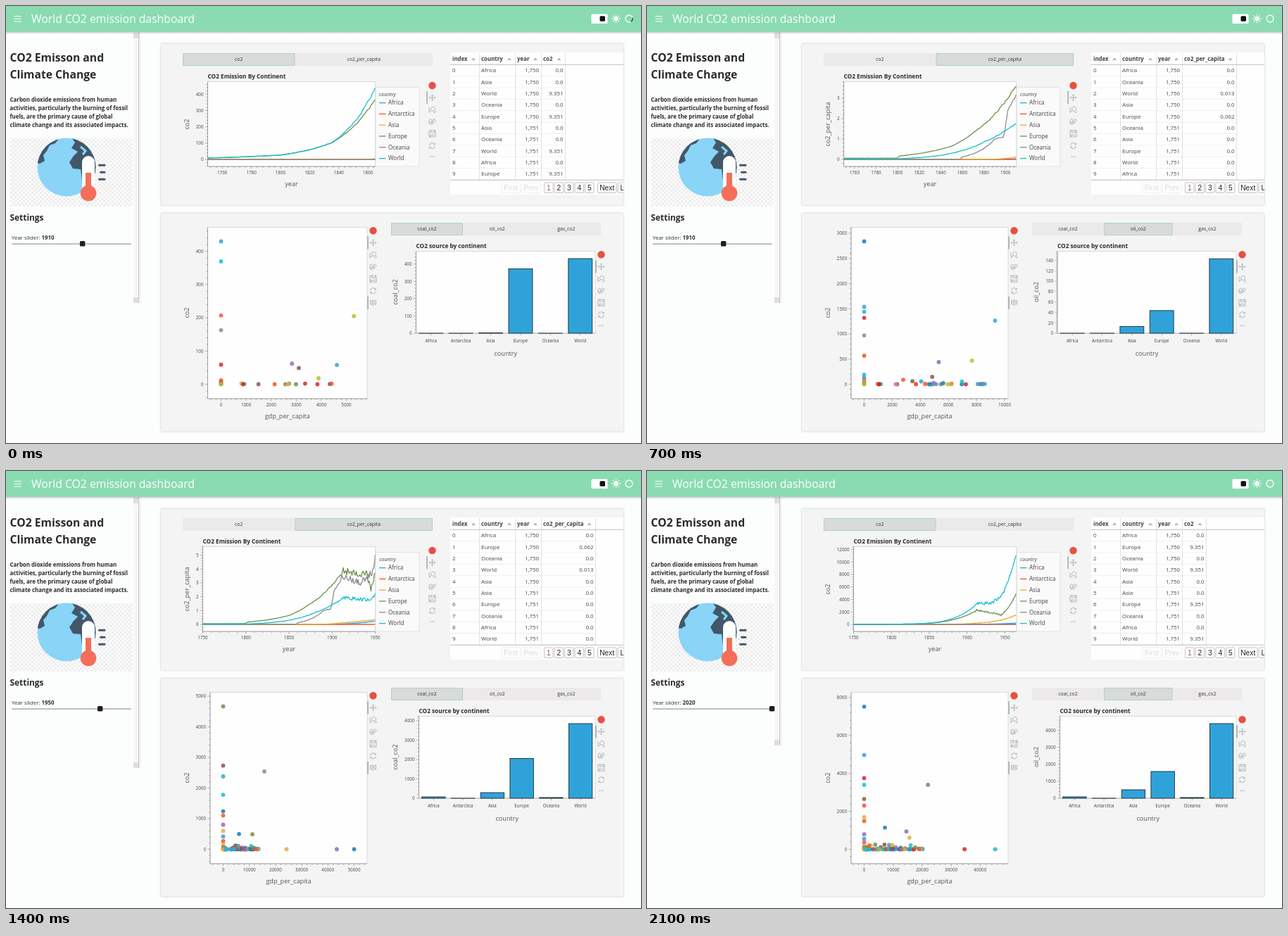
Recreate the animation shown at these times as an HTML page. Size 902 by 621 pixels, loop 2.8 s.

```html
<!DOCTYPE html>
<html lang="en">
<head>
<meta charset="utf-8">
<title>Emission dashboard</title>
<style>
html, body { margin: 0; width: 100%; height: 100%; overflow: hidden; background: #fcfefd; }
svg { display: block; width: 902px; height: 621px; font-family: "Open Sans", sans-serif; }
.card { fill: #f4f4f4; filter: drop-shadow(0 0.5px 1px #0004); }
.btn { font-family: "Liberation Sans", Arial, sans-serif; }
</style>
</head>
<body>
<svg id="stage" viewBox="0 0 902 621" xmlns="http://www.w3.org/2000/svg"></svg>
<script>
const STEP = 700;
const PLACES = ['Africa', 'Antarctica', 'Asia', 'Europe', 'Oceania', 'World'];
const INK = ['#30a2da', '#fc4f30', '#e5ae38', '#6d904f', '#8b8b8b', '#17becf'];
const DOTS = [...INK, '#9467bd', '#d62728', '#1f77b4', '#e377c2', '#bcbd22', '#8c564b'];
const MID = 'text-anchor="middle"', END = 'text-anchor="end"';

const text = (x, y, s, size, attr = '', fill = '#444') =>
  `<text x="${x}" y="${y}" font-size="${size}" fill="${fill}" ${attr}>${s}</text>`;
const bold = (x, y, s, size, fill = '#2b2b2b') => text(x, y, s, size, 'font-weight="700"', fill);
const rect = (x, y, w, h, fill, attr = '') =>
  `<rect x="${x}" y="${y}" width="${w}" height="${h}" fill="${fill}" ${attr}/>`;
const path = (d, stroke, w = 1, attr = '') =>
  `<path d="${d}" fill="none" stroke="${stroke}" stroke-width="${w}" ${attr}/>`;
const circle = (x, y, r, fill, attr = '') => `<circle cx="${x}" cy="${y}" r="${r}" fill="${fill}" ${attr}/>`;
const turned = (x, y, s) =>
  text(0, 0, s, 9.1, `${MID} transform="translate(${x} ${y}) rotate(-90)"`, '#555');

function random(seed) {
  return () => (seed = (seed * 16807) % 2147483647) / 2147483647;
}

// Linear scale: pixel of the base value, pixels per labelled step, size of the step.
function scale(zero, px, step, base = 0) {
  const at = v => zero + (v - base) * px / step;
  return { at, px, step, base };
}

function axis([l, t, r, b], { at, px, step, base }, vertical) {
  const lo = vertical ? t : l, hi = vertical ? b : r;
  let d = vertical ? `M${l} ${t}V${b}` : `M${l} ${b}H${r}`, out = '';
  for (let k = -10; k < 60; k++) {
    const v = base + step * k / 5, p = at(v), len = k % 5 ? 2 : 3.5;
    if (p < lo - 0.5 || p > hi + 0.5) continue;
    d += vertical ? `M${l} ${p}h${-len}` : `M${p} ${b}v${len}`;
    if (k % 5 === 0) out += vertical ? text(l - 6, p + 2.3, v, 6.3, END) : text(p, b + 11.3, v, 6.3, MID);
  }
  return path(d, '#777', 0.6) + out;
}

const frame = ([l, t, r, b]) => rect(l, t, r - l, b - t, '#fdfefd', 'stroke="#d4d4d4" stroke-width="0.8"');

function tabs(edges, names, on, y) {
  let out = rect(edges[0], y, edges[edges.length - 1] - edges[0], 18, '#ece9ea');
  out += rect(edges[on] + 0.5, y + 0.5, edges[on + 1] - edges[on] - 1, 17, '#d9dada', 'stroke="#9fd0bc" stroke-width="0.8"');
  names.forEach((s, i) => out += text((edges[i] + edges[i + 1]) / 2, y + 11.4, s, 6.85, MID, '#333'));
  return out;
}

const ICONS = {
  pan: 'M-4 0H4M0-4V4M-3-1.5L-4.5 0L-3 1.5M3-1.5L4.5 0L3 1.5M-1.5-3L0-4.5L1.5-3M-1.5 3L0 4.5L1.5 3',
  zoom: 'M1-4a3 3 0 1 0 .1 0M-1.2 1.2L-4.5 4.5M-4.5-3v6H-3M2 4H4.5V2',
  wheel: 'M-2.5-3.5a2 2.6 0 1 0 .1 0zM-4.4 0v2.5a2 2 0 0 0 3.8 0V0M2.5-3.5a2 2 0 1 0 .1 0M1.5 .5L.5 4',
  save: 'M-4.5-4.5H4.5V4.5H-4.5zM-2-4.5V-1.5H3V-4.5M-3 4.5V2H3',
  reset: 'M-4-.5A4 4 0 0 1 3.5-2M4 .5A4 4 0 0 1-3.5 2M3.7-4v2.2H1.5M-3.7 4V1.8H-1.5',
  hover: 'M-4-3.5H4V2H1.5L0 4L-1.5 2H-4zM-2.5-1.5H2.5M-2.5.3H2.5'
};
function toolbar(x, y, hover) {
  const names = Object.keys(ICONS).slice(0, hover ? 6 : 5);
  let out = circle(x, y, 5.2, '#e8503f');
  names.forEach((n, i) => {
    const cy = y + 17.1 * (i + 1);
    out += path(ICONS[n], '#a0a4a6', 0.8, `transform="translate(${x} ${cy})"`);
    if (n === 'pan' || n === 'hover') out += rect(x - 8, cy - 9, 1.1, 18, '#6f9482');
  });
  if (!hover) for (const k of [-2.5, 0, 2.5]) out += circle(x + k, y + 101, 0.7, '#999');
  return out;
}

function globe() {
  const slate = '#42586a';
  return rect(6, 188, 173.5, 97, 'url(#check)') +
    '<g clip-path="url(#disc)">' + rect(40, 185, 95, 90, '#8ad4f8') +
    `<path fill="${slate}" d="M40 185H78L70 195L62 198L58 206L53 212L55 220L48 224L40 222z
      M92 185L98 194L93 202L102 207L96 213L90 222L95 231L106 232L108 248L132 250V185z"/>` +
    path('M106 200l7 6l-4 5', '#8ad4f8', 3) + '</g>' +
    path('M117 222V264', '#fdfefe', 18, 'stroke-linecap="round"') +
    path('M117 237V264', '#f46e59', 8) + circle(117, 266, 11.3, '#f46e59') +
    path('M132.5 226.3h7.5M134.5 236.3h5.5M132.5 246.2h7.5', slate, 3, 'stroke-linecap="round"');
}

function backdrop() {
  return `<defs>
    <pattern id="check" width="6" height="6" patternUnits="userSpaceOnUse"><path d="M0 0H6V6H0z" fill="#fff"/><path d="M0 0H3V3H0zM3 3H6V6H3z" fill="#ececec"/></pattern>
    <linearGradient id="fade" x2="0" y2="1"><stop stop-color="#000" stop-opacity=".25"/><stop offset="1" stop-color="#000" stop-opacity="0"/></linearGradient>
    <clipPath id="disc"><circle cx="86" cy="229" r="41.5"/></clipPath>
    <clipPath id="plot"><path d="M278 107H525V229H278z"/></clipPath>
    <clipPath id="grid"><path d="M631 66H877V268H631z"/></clipPath></defs>` +
    rect(0, 0, 902, 621, '#fcfefd') +
    rect(220, 53.5, 657, 229.5, '', 'class="card" rx="1.5"') + rect(220, 294.5, 657, 310, '', 'class="card" rx="1.5"');
}

function header(busy) {
  let out = rect(0, 36, 902, 4, 'url(#fade)') + rect(0, 0, 902, 36.5, '#8adbb2');
  out += path('M11.5 14.5h10.5M11.5 18.2h10.5M11.5 22h10.5', '#fff', 1.1);
  out += text(36, 24, 'World CO2 emission dashboard', 15.75, '', '#fff');
  out += rect(831.5, 11.5, 23, 13.5, '#fff', 'rx="1.5"') + rect(843.5, 14.3, 7.5, 7.5, '#111', 'rx="1.5"');
  out += circle(866.5, 18, 3.4, '#fff');
  for (let a = 0; a < 360; a += 45)
    out += path('M0-4.6V-6.4', '#fff', 1.3, `transform="translate(866.5 18) rotate(${a})"`);
  out += circle(885, 18, 5, 'none', 'stroke="#fff" stroke-width="1.3"');
  return out + (busy ? path('M889.8 16.6A5 5 0 0 1 887.5 22.3', '#2f4a3f', 1.4) : '');
}

function sidebar(year, bottom) {
  const knob = 8.5 + 169 * (year - 1750) / 270;
  let out = rect(188, 37, 1.2, bottom - 37, '#c8c8c8') + rect(189.2, 37, 2, bottom - 37, '#f0f0f0');
  out += rect(0, 37, 181, bottom - 37, '#fcfefd') + rect(181, 37, 7, bottom - 37, '#f8f7f8');
  out += rect(181, 38, 7, 8, '#dedede') + rect(181, bottom - 8, 7, 8, '#dedede');
  out += bold(5.5, 79, 'CO2 Emisson and', 15.7) + bold(5.5, 103, 'Climate Change', 15.7);
  ['Carbon dioxide emissions from human', 'activities, particularly the burning of fossil',
    'fuels, are the primary cause of global', 'climate change and its associated impacts.']
    .forEach((s, i) => out += bold(5.5, 136 + 12 * i, s, 7.9));
  out += globe() + bold(5.5, 305.3, 'Settings', 11.9);
  out += text(8, 331.6, `Year slider: <tspan font-weight="700">${year}</tspan>`, 7.9, '', '#333');
  return out + rect(8, 337, 170, 2.2, '#c2c2c2', 'rx="1"') + rect(knob - 3.7, 334, 7.4, 7.4, '#1e1e1e', 'rx="1.5"');
}

function table(names, field) {
  const per = field !== 'co2', last = per ? 837.5 : 794.5;
  const amount = per ? { World: '0.013', Europe: '0.062' } : { World: '9.351', Europe: '9.351' };
  let out = rect(631, 66, 246, 202, '#fefefe');
  const heads = [[634, 'index', 664], [675, 'country', 715], [726, 'year', 752], [763, field, last - 9]];
  for (const [x, s, a] of heads)
    out += bold(x, 78, s, 7.9, '#444') + `<path d="M${a - 3} 77l3-3.5l3 3.5z" fill="#b5b5b5"/>`;
  names.forEach((s, i) => {
    const y = 94.3 + 16.35 * i;
    out += text(634, y, i, 7.9) + text(675, y, s, 7.9) + text(757, y, i < 5 ? '1,750' : '1,751', 7.9, END);
    out += text(last - 3, y, per && i > 4 ? '0.0' : amount[s] || '0.0', 7.9, END);
    out += path(`M631 ${y + 5.4}H${last}`, '#e6e6e6', 0.6);
  });
  out += path(`M672.5 67V247M723.5 67V247M760.5 67V247M${last} 67V247`, '#d6d6d6', 0.7);
  out += path('M631 83.3H877M631 247.3H877', '#b0b0b0', 0.8);
  let x = 704;
  for (const s of ['First', 'Prev', '1', '2', '3', '4', '5', 'Next', 'Last']) {
    const off = s === 'First' || s === 'Prev', w = s > '9' ? 26.5 : 12.5;
    if (s === '1' || s === 'Next') x += 3.5;
    out += rect(x, 251, w, 14.5, '#fefefe', `rx="1.5" stroke="${off ? '#ececec' : '#b4b4b4'}" stroke-width="0.8"`);
    out += text(x + w / 2, 261.6, s, 10.2, `${MID} class="btn"`, off ? '#dcdcdc' : s === '1' ? '#a0624a' : '#222');
    x += w + 2;
  }
  return `<g clip-path="url(#grid)">${out}</g>`;
}

// Key values by year; growth between them is exponential.
const HISTORY = {
  co2: {
    Africa: [[1890, 0], [1965, 220]],
    Asia: [[1860, 0], [1910, 180], [1945, 700], [1965, 1550]],
    Europe: [[1750, 9], [1800, 27], [1835, 102], [1865, 370], [1913, 2300], [1932, 1900], [1945, 1500], [1965, 4950]],
    World: [[1750, 9], [1800, 27], [1835, 103], [1865, 440], [1913, 3300], [1932, 3400], [1945, 4500], [1965, 11300]]
  },
  co2_per_capita: {
    Africa: [[1890, 0], [1950, 0.25]],
    Asia: [[1880, 0], [1910, 0.12], [1950, 0.35]],
    Europe: [[1750, 0.06], [1799, 0.06], [1802, 0.17], [1850, 0.65], [1870, 1.3], [1913, 3.9], [1940, 3.6], [1945, 2.6], [1950, 3.7]],
    Oceania: [[1857, 0], [1860, 0.12], [1890, 1], [1898, 1.1], [1902, 2.4], [1913, 3.5], [1932, 3], [1948, 3.8], [1950, 5]],
    World: [[1750, 0.013], [1800, 0.03], [1850, 0.3], [1880, 0.85], [1913, 1.9], [1945, 1.75], [1950, 2.25]]
  }
};

function level(keys, year) {
  const i = keys.findIndex(k => k[0] > year);
  if (i === 0) return 0;
  if (i < 0) return keys[keys.length - 1][1];
  const [[y0, a], [y1, b]] = [keys[i - 1], keys[i]], e = b / 10;
  return (a + e) * ((b + e) / (a + e)) ** ((year - y0) / (y1 - y0)) - e;
}

function lineChart({ left, end, every, unit, rise, field }) {
  const box = [left, 107.5, 524.5, 228], perYear = (524.5 - left) / (end - 1750);
  const first = Math.ceil(1750 / every) * every;
  const x = scale(left + (first - 1750) * perYear, perYear * every, every, first), y = scale(218, -rise, unit);
  let out = frame(box) + axis(box, x) + axis(box, y, true), plot = '';
  out += bold(left, 103.2, 'CO2 Emission By Continent', 8.25);
  out += turned(260, 168, field) + text((left + 524.5) / 2, 256.3, 'year', 9.1, MID, '#555');
  PLACES.forEach((name, i) => {
    const keys = HISTORY[field][name] || [[1750, 0]], rnd = random(900 + 31 * i);
    let d = '';
    for (let t = 1750; t <= end; t++) {
      const wobble = t > 1910 && t < 1950 ? 0.15 : 0.035;
      const v = level(keys, t) * (1 + wobble * (rnd() - 0.5));
      d += `${d ? 'L' : 'M'}${x.at(t).toFixed(1)} ${y.at(v).toFixed(1)}`;
    }
    plot += path(d, INK[i], 1.3, 'stroke-linejoin="round"');
  });
  out += `<g clip-path="url(#plot)">${plot}</g>`;
  out += rect(525, 115.5, 62, 112.5, '#f9faf9', 'stroke="#dcdcdc" stroke-width="0.8"');
  out += text(530, 128, 'country', 7.1, 'font-style="italic"');
  PLACES.forEach((name, i) => {
    const ly = 137.6 + 15.8 * i;
    out += path(`M530 ${ly}h9.5`, INK[i], 1.3) + text(543, ly + 2.8, name, 8.05);
  });
  return out + toolbar(605.5, 113);
}

// leaders: income, emission, colour. The crowd hugs the baseline between two incomes.
function scatter({ left, x, y, leaders, crowd: [count, from, to] }) {
  const box = [left, 314.5, 513, 558], rnd = random(77);
  const dot = (gdp, co2, c) => circle(x.at(gdp).toFixed(1), y.at(co2).toFixed(1), 2.9, DOTS[c], 'fill-opacity="0.85"');
  const hue = () => Math.floor(rnd() * DOTS.length);
  let out = frame(box) + axis(box, x) + axis(box, y, true);
  out += turned(259.5, 436, 'co2') + text((left + 513) / 2, 585.6, 'gdp_per_capita', 9.1, MID, '#555');
  const low = Math.min(...leaders.filter(p => !p[0]).map(p => p[1]));
  for (let i = 1; i < 7; i++) out += dot(0, low * (1 - i / 6) ** 2, hue());
  for (let i = 0; i < count; i++)
    out += dot(from + (to - from) * rnd() ** 1.5, y.step * 0.13 * rnd() ** 5, hue());
  for (const p of leaders) out += dot(...p);
  return out + toolbar(521.5, 319.3, true);
}

function barChart({ left, y, field, values }) {
  const box = [left, 348.5, 837, 465], step = (837 - left) / 6;
  let out = frame(box) + axis(box, y, true) + path(`M${left} 465H837`, '#999', 0.6);
  out += bold(left, 343.8, 'CO2 source by continent', 8.25);
  out += turned(556, 406.5, field) + text((left + 837) / 2, 496.6, 'country', 9.1, MID, '#555');
  PLACES.forEach((name, i) => {
    const c = left + step * (i + 0.5), w = step * 0.8, top = y.at(values[i]);
    out += rect(c - w / 2, top, w, Math.max(0.1, 465 - top), INK[0], 'stroke="#1c2b33" stroke-width="0.9"');
    out += path(`M${c} 465v3`, '#777', 0.6) + text(c, 478, name, 6.2, MID);
  });
  return out + toolbar(845.5, 353.3);
}

const LATE = ['Africa', 'Europe', 'Oceania', 'World', 'Asia', 'Asia', 'Europe', 'Oceania', 'Africa', 'World'];
const scenes = [
  {
    busy: true, year: 1910, bottom: 422, source: 0,
    rows: ['Africa', 'Asia', 'World', 'Oceania', 'Europe', 'Asia', 'Oceania', 'World', 'Africa', 'Europe'],
    line: { left: 286.5, end: 1865, every: 20, unit: 100, rise: 23.2, field: 'co2' },
    dots: {
      left: 286.5, x: scale(305.5, 35.6, 1000), y: scale(537.5, -47.2, 100), crowd: [13, 700, 4500],
      leaders: [[0, 430, 0], [0, 370, 5], [0, 207, 1], [0, 163, 4], [0, 59, 7], [0, 12, 1],
        [5300, 205, 10], [2830, 62, 6], [3100, 49, 11], [4620, 58, 0], [3890, 18, 10]]
    },
    bars: { left: 582.5, y: scale(465, -24.6, 100), field: 'coal_co2', values: [0, 0, 2, 372, 0, 431] }
  },
  {
    year: 1910, bottom: 422, source: 1,
    rows: ['Africa', 'Oceania', 'World', 'Asia', 'Europe', 'Oceania', 'Asia', 'Europe', 'World', 'Africa'],
    line: { left: 279.5, end: 1910, every: 20, unit: 1, rise: 29, field: 'co2_per_capita' },
    dots: {
      left: 290, x: scale(308.5, 39.9, 2000), y: scale(537.5, -35.75, 500), crowd: [32, 700, 8600],
      leaders: [[0, 2840, 8], [0, 1540, 0], [0, 1440, 5], [0, 1320, 7], [0, 970, 4], [0, 566, 1], [0, 190, 5],
        [9320, 1265, 0], [7670, 470, 10], [5310, 440, 6], [4840, 147, 11], [2780, 90, 1]]
    },
    bars: { left: 583, y: scale(465, -14.8, 20), field: 'oil_co2', values: [0, 0, 13, 43.5, 0, 143] }
  },
  {
    year: 1950, bottom: 422, source: 0, rows: LATE,
    line: { left: 279.5, end: 1950, every: 50, unit: 1, rise: 19.7, field: 'co2_per_capita' },
    dots: {
      left: 290, x: scale(308.5, 37.2, 10000), y: scale(537.5, -43.5, 1000), crowd: [60, 0, 13500],
      leaders: [[0, 4670, 3], [0, 2730, 11], [0, 2380, 0], [0, 1780, 5], [0, 1240, 8], [0, 1100, 1], [0, 800, 6], [0, 600, 2],
        [15700, 2540, 4], [6050, 500, 8], [11150, 490, 3], [24200, 0, 2], [43400, 0, 6], [50000, 0, 8]]
    },
    bars: { left: 586.5, y: scale(465, -27.5, 1000), field: 'coal_co2', values: [70, 0, 290, 2055, 36, 3855] }
  },
  {
    year: 2020, bottom: 390, source: 1, rows: LATE,
    line: { left: 293.5, end: 1965, every: 50, unit: 2000, rise: 17.75, field: 'co2' },
    dots: {
      left: 290, x: scale(308.5, 41.2, 10000), y: scale(537.5, -53.9, 2000), crowd: [70, 0, 20200],
      leaders: [[0, 7520, 8], [0, 4970, 0], [0, 3750, 7], [0, 3400, 5], [0, 2650, 11], [0, 2300, 1], [0, 1690, 2], [0, 1480, 1],
        [0, 790, 6], [22000, 3400, 3], [7150, 1140, 8], [14560, 940, 6], [15600, 610, 2], [34600, 0, 7], [45200, 0, 5]]
    },
    bars: { left: 586.5, y: scale(465, -24.1, 1000), field: 'oil_co2', values: [83, 0, 498, 1577, 41, 4400] }
  }
];

function draw(s) {
  const fields = Object.keys(HISTORY), tab = fields.indexOf(s.line.field);
  return sidebar(s.year, s.bottom) + header(s.busy) +
    tabs([251, 410.5, 606], fields, tab, 67) +
    tabs([547, 649, 746.5, 845], ['coal_co2', 'oil_co2', 'gas_co2'], s.source, 308) +
    lineChart(s.line) + table(s.rows, s.line.field) + scatter(s.dots) + barChart(s.bars);
}

const stage = document.getElementById('stage');
stage.innerHTML = backdrop() + scenes.map(s => `<g class="scene" display="none">${draw(s)}</g>`).join('');
const layers = [...stage.querySelectorAll('.scene')];
const start = performance.now();
let shown = -1;

function tick() {
  const now = Math.floor((performance.now() - start) / STEP) % layers.length;
  if (now !== shown) {
    layers.forEach((g, i) => g.setAttribute('display', i === now ? 'inline' : 'none'));
    shown = now;
  }
  requestAnimationFrame(tick);
}
tick();
</script>
</body>
</html>
```
